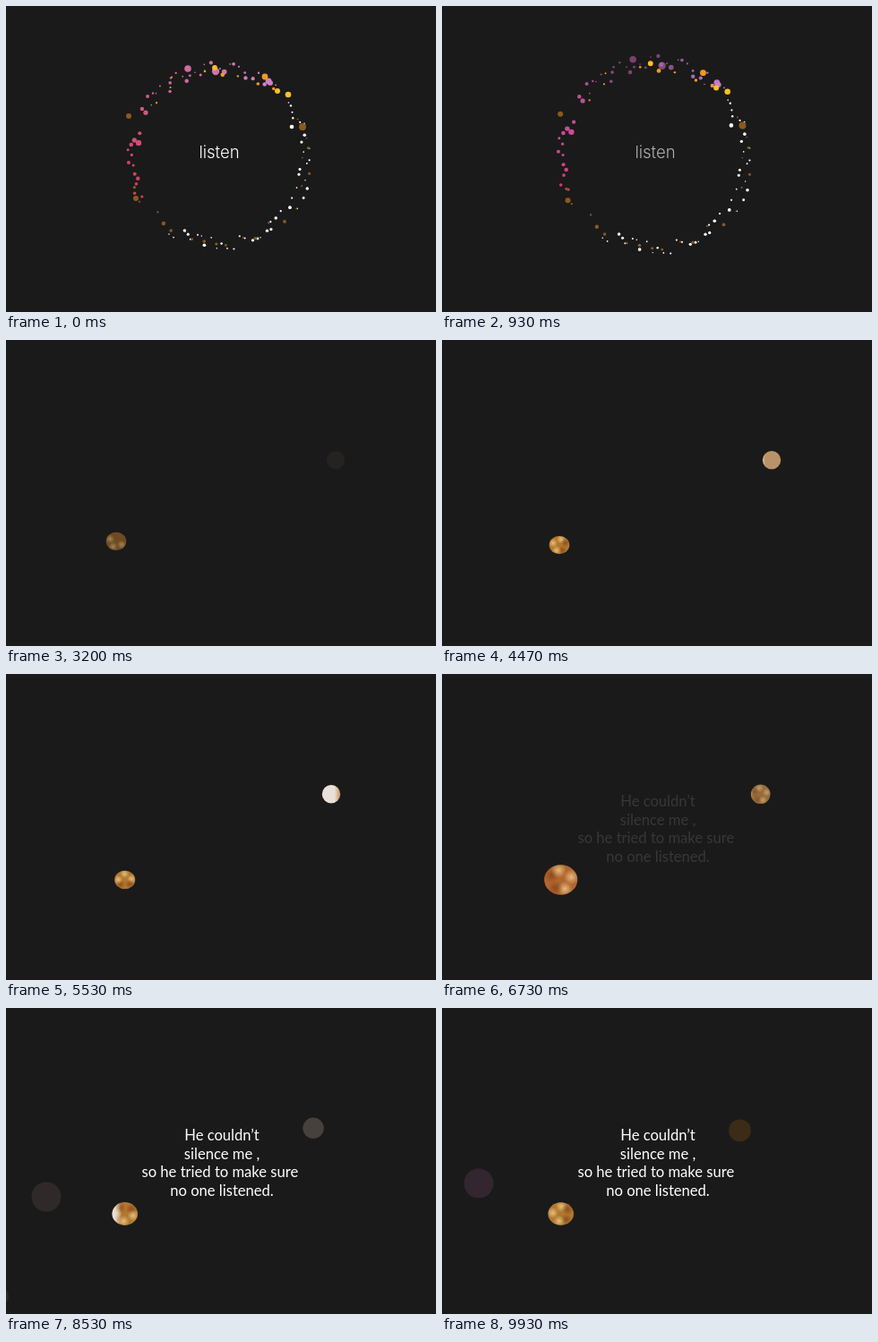
Write an HTML page with a canvas that moves like this. It is 480 by 342 pixels and loops after 9.99 s.

```html
<!DOCTYPE html>
<html lang="en">
<head>
<meta charset="utf-8">
<title>listen</title>
<style>
  html, body { margin: 0; height: 100%; overflow: hidden; background: #1a1a1a; }
  canvas { display: block; width: 100%; height: 100%; }
</style>
</head>
<body>
<canvas id="stage" width="480" height="342"></canvas>
<script>
const ctx = document.getElementById('stage').getContext('2d');
const LOOP = 9990, CX = 238, CY = 168, TAU = Math.PI * 2;
const ramp = (t, from, to) => Math.max(0, Math.min(1, (t - from) / (to - from)));
const bump = (t, peak, width) => Math.exp(-(((t - peak) / width) ** 2));
const smooth = k => k * k * (3 - 2 * k);

let seed = 11;
const random = () => (seed = (seed * 16807) % 2147483647) / 2147483647;
const between = (a, b) => a + (b - a) * random();

const colors = { amber: '#f09a1e', gold: '#ffbf24', brown: '#8a5a1c', white: '#fff' };
const dots = [];

// Evenly spread, jittered dots along an arc given in degrees clockwise from the right
function arc(kind, count, from, to, small, large) {
  const step = (to - from) / count;
  for (let i = 0; i < count; i++) {
    const angle = (from + (i + between(.1, .9)) * step) * Math.PI / 180;
    dots.push({ kind, angle, dist: between(91, 105), size: small + (large - small) * random() ** 2 });
  }
}
function accent(kind, x, y, size) {
  const dx = x - CX, dy = y - CY;
  dots.push({ kind, angle: (Math.atan2(dy, dx) + TAU) % TAU, dist: Math.hypot(dx, dy), size });
}
arc('pink', 12, 152, 198, 1.5, 3);
arc('pink', 32, 208, 310, .8, 3);
arc('white', 46, -40, 125, .7, 2);
arc('brown', 20, -30, 165, .8, 2.4);
arc('amber', 8, 210, 318, 1, 2.6);
accent('pink', 148, 153, 3.2);
accent('pink', 203, 70, 3.8);
accent('pink', 234, 73, 4.2);
accent('pink', 293, 84, 3.4);
accent('gold', 233, 69, 2.9);
accent('amber', 289, 79, 3.4);
accent('gold', 303, 95, 3);
accent('gold', 315, 99, 3.3);
accent('brown', 331, 135, 4);
accent('white', 319, 135, 2.3);
accent('brown', 145, 215, 3);
accent('brown', 137, 123, 3);

function disc(x, y, rx, ry = rx) {
  ctx.beginPath();
  ctx.ellipse(x, y, rx, ry, 0, 0, TAU);
  ctx.fill();
}

function drawRing(t) {
  const u = t / 930, fade = 1 - ramp(t, 950, 1730);
  if (!fade) return;
  for (const { kind, angle, dist, size } of dots) {
    const pink = kind === 'pink';
    const a = angle + (pink ? .117 * u : 0);
    const r = dist * (1 + (pink ? .05 : .03) * u + .018 * u * u);
    const turn = angle * 180 / Math.PI - 180;
    // The top of the ring darkens first
    const dimming = pink ? 1 - .5 * Math.min(1, u) * bump(turn, 75, 35) : 1;
    ctx.globalAlpha = fade * dimming;
    ctx.fillStyle = pink
      ? `hsl(${344 - turn * .26 - 16 * u} ${60 - turn * .12}% ${55 + turn * .09}%)`
      : colors[kind];
    disc(CX + r * Math.cos(a), CY + r * Math.sin(a), size);
  }
}

function drawOrb({ x, y, rx, ry = rx, alpha, color, spots = 0, shine = 0 }, t) {
  ctx.save();
  ctx.globalAlpha = alpha;
  ctx.fillStyle = color;
  disc(x, y, rx, ry);
  ctx.clip();
  ctx.globalAlpha = alpha * spots;
  for (let i = 0; i < 5; i++) {
    const a = i * 2.4 + t / 900, size = rx * .45;
    const sx = x + Math.cos(a) * rx * .65, sy = y + Math.sin(a) * ry * .65;
    const tint = i % 2 ? '#7a3c14' : '#ffe6a8';
    const glow = ctx.createRadialGradient(sx, sy, 0, sx, sy, size);
    glow.addColorStop(0, tint);
    glow.addColorStop(1, tint + '00');
    ctx.fillStyle = glow;
    disc(sx, sy, size);
  }
  // Light falling in from the left
  ctx.globalAlpha = alpha * Math.min(1, shine * 3);
  const light = ctx.createLinearGradient(x - rx, 0, x - rx + 2 * rx * shine + .1, 0);
  light.addColorStop(0, '#e8e0da');
  light.addColorStop(shine * .75, '#e8e0da');
  light.addColorStop(1, '#e8e0da00');
  ctx.fillStyle = light;
  disc(x, y, rx, ry);
  ctx.restore();
}

function drawOrbs(t) {
  const slide = smooth(ramp(t, 3300, 4900));
  const swell = bump(t, 6850, 750);
  const leftSize = 11.3 + 3 * ramp(t, 5530, 6500) + 4.4 * swell;
  drawOrb({
    x: 123 + 9.7 * slide, y: 225 + 5 * slide, rx: leftSize, ry: leftSize * .9,
    alpha: ramp(t, 2470, 3800), color: `hsl(${33 - 8 * swell} 58% 44%)`,
    spots: .65, shine: .36 * bump(t, 8530, 500)
  }, t);

  const decline = ramp(t, 5530, LOOP);
  const gray = bump(t, 8530, 700);
  drawOrb({
    x: 368 - 36 * ramp(t, 4470, LOOP) ** 1.2, y: 134.3 + 2.7 * ramp(t, 8530, LOOP),
    rx: 10.2 + 2.3 * decline, alpha: ramp(t, 3100, 4600),
    color: `hsl(32 ${45 - 37 * gray}% ${61 - 45 * decline ** .6}%)`,
    spots: .45 * bump(t, 6900, 700), shine: .95 * bump(t, 5530, 800)
  }, t);

  const drift = (t - 8530) / 1400;
  drawOrb({
    x: 45 - 4 * drift, y: 211 - 15 * drift, rx: 16.5,
    alpha: ramp(t, 7900, 8530), color: `hsl(${355 - 30 * drift} ${7 + 8 * drift}% 17.5%)`
  }, t);
  drawOrb({ x: -7, y: 322 - 6 * drift, rx: 10, alpha: bump(t, 8530, 400), color: '#2a2a2a' }, t);
}

function drawText(lines, x, y, step, font, alpha) {
  ctx.globalAlpha = alpha;
  ctx.fillStyle = '#fff';
  ctx.font = font;
  ctx.textAlign = 'center';
  lines.forEach((line, i) => ctx.fillText(line, x, y + i * step));
}

const quote = ['He couldn’t', 'silence me ,', 'so he tried to make sure ', 'no one listened.'];
const start = performance.now();

function draw() {
  const t = (performance.now() - start) % LOOP;
  ctx.globalAlpha = 1;
  ctx.fillStyle = '#1a1a1a';
  ctx.fillRect(0, 0, 480, 342);
  drawRing(t);
  drawOrbs(t);
  drawText(['listen'], 238, 170, 0, '300 18.5px Inter, "Liberation Sans", sans-serif', 1 - ramp(t, 500, 1730));
  drawText(quote, 241, 148.3, 20.4, '16.6px Lato, "Open Sans", sans-serif', ramp(t, 6600, 7600));
  requestAnimationFrame(draw);
}
draw();
</script>
</body>
</html>
```
